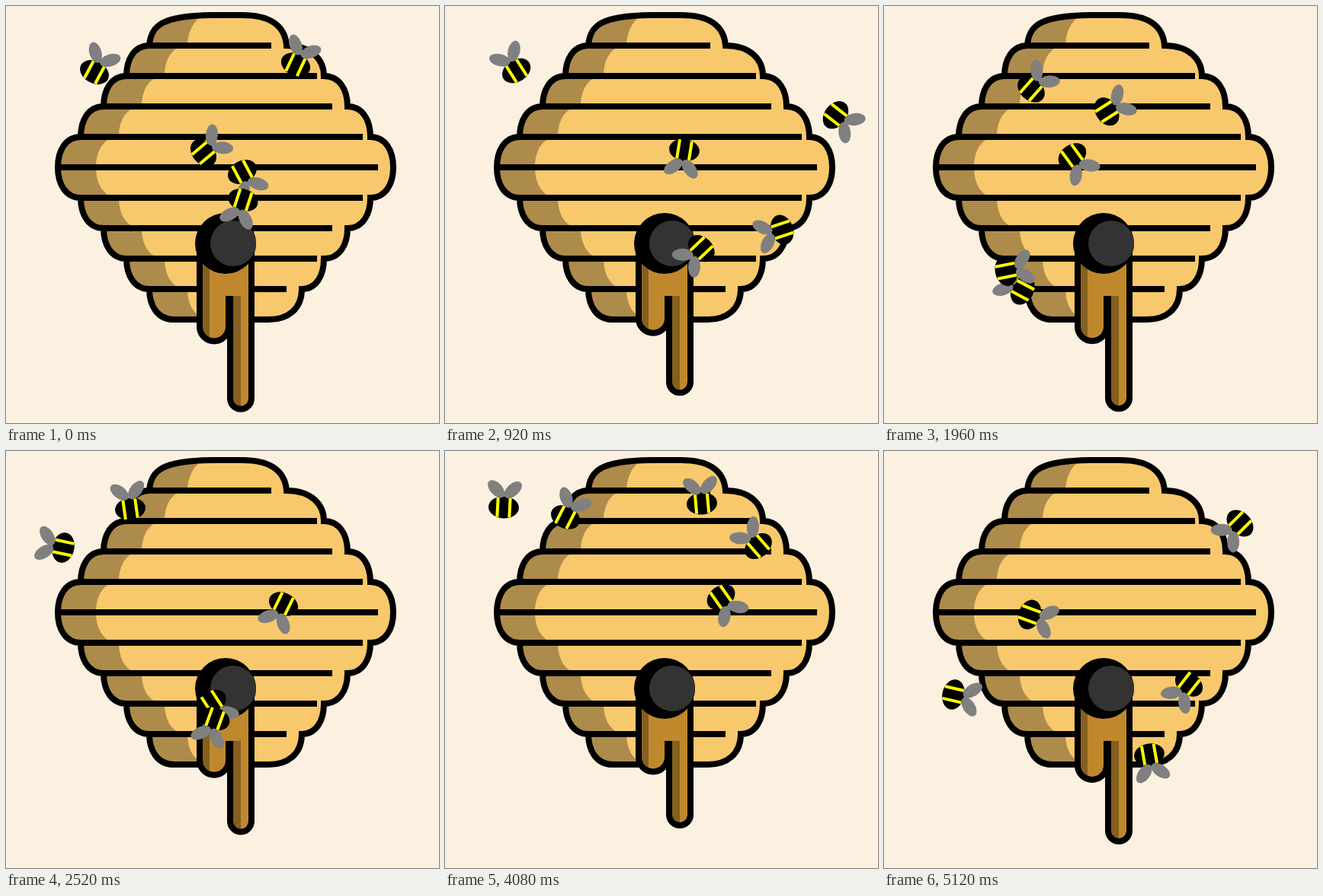
An HTML page with a canvas for the animation above (5.16 s loop, 568 by 548 pixels).

```html
<!DOCTYPE html>
<html lang="en">
<head>
<meta charset="utf-8">
<title>Beehive</title>
<style>
html, body { margin: 0; width: 100%; height: 100%; overflow: hidden; background: #fcf1e0; }
canvas { display: block; }
</style>
</head>
<body>
<canvas id="stage" width="568" height="548"></canvas>
<script>
const ctx = document.getElementById('stage').getContext('2d');
const LOOP = 5160, STEP = 40;
const LIGHT = '#f8c86c', SHADE = '#ad8b4b', HONEY = '#c0882c', HONEY_SHADE = '#855f1f';

// Right contour and end of the seam for each seam, top to bottom
const seams = [[368, 348], [417, 408], [448, 428], [478, 468], [508, 488],
               [478, 468], [448, 428], [417, 408], [388, 368]];
const leftEdge = i => 68 + 30 * Math.abs(i - 4);
const seamY = i => 52 + 40 * i;

// Quarter bulge: leaves sideways when widening, straight down when narrowing
function bulge(path, x0, y0, x1, y1, sideways) {
  if (sideways) path.bezierCurveTo(x0 + (x1 - x0) * .66, y0, x1, y0 + 18, x1, y1);
  else path.bezierCurveTo(x0, y0 + 22, x0 + (x1 - x0) * .34, y1, x1, y1);
}

function leftSide(path, dx) {
  for (let i = 0; i < 8; i++)
    bulge(path, leftEdge(i) + dx, seamY(i), leftEdge(i + 1) + dx, seamY(i + 1), i < 4);
  bulge(path, 188 + dx, 372, 220 + dx, 412, false);
}

function hiveOutline() {
  const p = new Path2D();
  p.moveTo(188, 52);
  leftSide(p, 0);
  p.lineTo(345, 412);
  p.bezierCurveTo(370, 412, 388, 398, 388, 372);
  for (let i = 8; i > 0; i--) {
    const [x0] = seams[i], [x1] = seams[i - 1], y0 = seamY(i), y1 = seamY(i - 1);
    if (i > 4) p.bezierCurveTo(x0 + (x1 - x0) * .66, y0, x1, y0 - 18, x1, y1);
    else p.bezierCurveTo(x0, y0 - 22, x0 + (x1 - x0) * .34, y1, x1, y1);
  }
  p.bezierCurveTo(366, 25, 345, 12, 310, 12);
  p.lineTo(270, 12);
  p.bezierCurveTo(205, 13, 190, 25, 188, 52);
  p.closePath();
  return p;
}

function litArea() {
  const p = new Path2D();
  p.moveTo(238, 52);
  leftSide(p, 50);
  p.lineTo(568, 412);
  p.lineTo(568, 12);
  p.lineTo(258, 12);
  p.bezierCurveTo(245, 20, 238, 36, 238, 52);
  return p;
}

const outline = hiveOutline(), lit = litArea();

function disc(x, y, r, color) {
  ctx.fillStyle = color;
  ctx.beginPath();
  ctx.arc(x, y, r, 0, 7);
  ctx.fill();
}

function drawHive() {
  ctx.save();
  ctx.clip(outline);
  ctx.fillStyle = SHADE;
  ctx.fillRect(0, 0, 568, 548);
  ctx.fillStyle = LIGHT;
  ctx.fill(lit);
  ctx.restore();
  ctx.strokeStyle = '#000';
  ctx.lineWidth = 8;
  ctx.stroke(outline);
  ctx.fillStyle = '#000';
  seams.forEach(([, end], i) => ctx.fillRect(leftEdge(i), seamY(i) - 4, end - leftEdge(i), 8));
}

function drip(x, top, width, bottom, shadeEnd) {
  const p = new Path2D();
  p.roundRect(x, top, width, bottom - 4 - top, [0, 0, width / 2, width / 2]);
  ctx.fillStyle = HONEY;
  ctx.fill(p);
  ctx.save();
  ctx.clip(p);
  ctx.fillStyle = HONEY_SHADE;
  ctx.fillRect(x, top, shadeEnd - x, bottom - top);
  ctx.restore();
  ctx.stroke(p);
}

function drawHoney(t) {
  const grow = ((t - 60 + 1985) % 1985) / 1985;
  drip(254, 320, 38, 425 + 20 * grow, 267);
  drip(294, 320, 28, 495 + 40 * grow, 308);
  ctx.fillStyle = HONEY;
  ctx.fillRect(267, 324, 51, 57);
  disc(288, 312, 40, '#000');
  disc(298, 312, 30, '#333');
}

// Waypoints of each bee: x, y, heading in degrees
const times = [0, 480, 1400, 2520, 3320, 4080, 5120];
const bees = [
  [[116, 87, 208], [167, 191, 0], [290, 261, 136], [270, 330, 327], [412, 347, 130], [362, 192, 325], [467, 95, 45]],
  [[380, 77, 205], [212, 72, 175], [151, 162, 43], [364, 201, 26], [361, 319, 221], [158, 87, 207], [191, 215, 290]],
  [[259, 193, 230], [335, 187, 25], [380, 298, 221], [75, 127, 102], [402, 320, 221], [337, 69, 175], [400, 306, 38]],
  [[310, 218, 332], [419, 189, 335], [415, 176, 160], [163, 76, 172], [341, 184, 18], [411, 125, 139], [348, 399, 350]],
  [[311, 255, 18], [359, 352, 223], [290, 372, 173], [274, 352, 20], [333, 365, 169], [77, 74, 183], [91, 320, 283]]
];
const SPEED = .45;

// Cubic curve through the waypoints; the bee turns with its tangent
function pose(points, t) {
  let i = 0;
  while (i < times.length - 2 && t >= times[i + 1]) i++;
  const span = times[i + 1] - times[i], u = Math.min(1, (t - times[i]) / span);
  const a = points[i], b = points[i + 1], pull = SPEED * span;
  const axis = (k, trig) => {
    const m0 = pull * trig(a[2] * Math.PI / 180), m1 = pull * trig(b[2] * Math.PI / 180);
    const c3 = 2 * (a[k] - b[k]) + m0 + m1, c2 = 3 * (b[k] - a[k]) - 2 * m0 - m1;
    return [((c3 * u + c2) * u + m0) * u + a[k], (3 * c3 * u + 2 * c2) * u + m0];
  };
  const [x, vx] = axis(0, Math.cos), [y, vy] = axis(1, Math.sin);
  return { x, y, angle: Math.atan2(-vy, -vx) };
}

function oval(x, y, rx, ry, angle, color) {
  ctx.fillStyle = color;
  ctx.beginPath();
  ctx.ellipse(x, y, rx, ry, angle, 0, 7);
  ctx.fill();
}

function drawBee({ x, y, angle }) {
  ctx.save();
  ctx.translate(x, y);
  ctx.rotate(angle);
  oval(0, 0, 20, 14.5, 0, '#000');
  ctx.fillStyle = '#ff0';
  ctx.fillRect(-10, -12.5, 4, 25.5);
  ctx.fillRect(6, -12.5, 4, 25.5);
  for (const side of [-1, 1])
    oval(11 * side, -23.5, 14, 8, -side * Math.PI / 4, '#808080');
  ctx.restore();
}

function frame(now) {
  let t = Math.floor(now % LOOP / STEP) * STEP;
  if (t > 5000 && t < 5120) t = 5000;
  ctx.fillStyle = '#fcf1e0';
  ctx.fillRect(0, 0, 568, 548);
  drawHive();
  drawHoney(t);
  bees.forEach(points => drawBee(pose(points, t)));
}

const start = performance.now();
function tick() {
  frame(performance.now() - start);
  requestAnimationFrame(tick);
}
tick();
</script>
</body>
</html>
```
